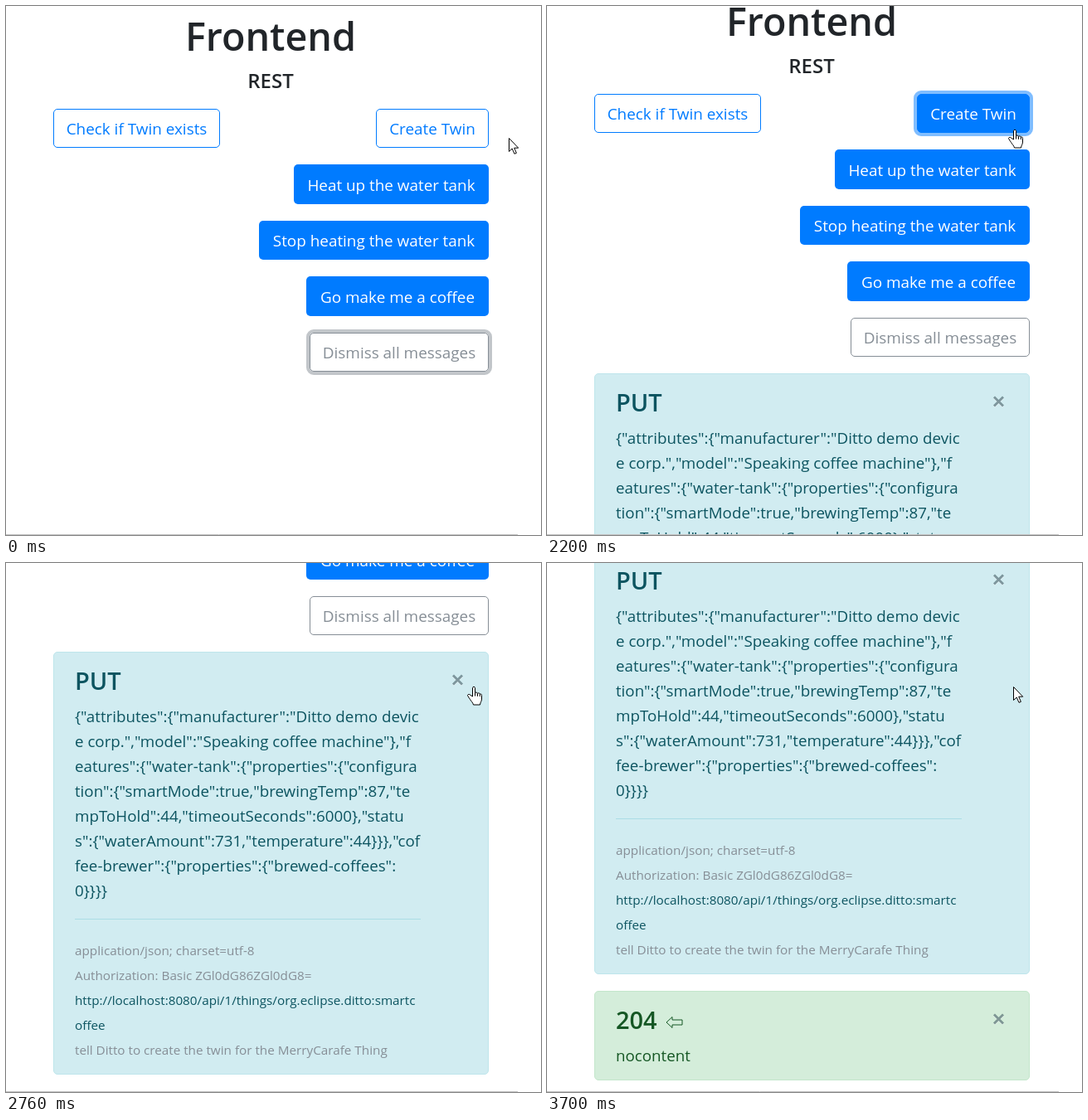
An HTML page that plays this animation: 645 px wide and 638 px high, repeating every 3.93 s.

```html
<!DOCTYPE html>
<html lang="en">
<head>
<meta charset="utf-8">
<title>Frontend</title>
<style>
  html, body { margin: 0; width: 100%; height: 100%; overflow: hidden; background: #fff; }
  svg { display: block; width: 645px; height: 638px; }
  text { font: 18.75px "Open Sans", "Noto Sans", sans-serif; }
  .mid text, .head { text-anchor: middle; }
  .head, .title { font-weight: 600; fill: #212529; }
  .h1 { font-size: 46.7px; }
  .h2 { font-size: 24px; }
  .title { font-size: 29px; }
  .btn rect { fill: #007bff; }
  .btn text { fill: #fff; font-size: 18.9px; }
  .line rect { fill: #fff; stroke: #007bff; }
  .line text { fill: #007bff; }
  .grey rect { stroke: #868e96; }
  .grey text { fill: #868e96; }
  .ring { fill: none; stroke-width: 4; opacity: .5; }
  .info text { fill: #0c5460; }
  .info .box { fill: #d1ecf1; stroke: #bee5eb; }
  .ok text { fill: #155724; }
  .ok .box { fill: #d4edda; stroke: #c3e6cb; }
  .small text { font-size: 15.25px; }
  .small .muted { fill: #868e96; }
  .x { fill: none; stroke-width: 2.8; }
  .cur { fill: #fff; stroke: #000; stroke-linejoin: round; }

  .page, .alerts, .pointer, .arrow, .hand, .oldring, .newring, .create rect, .create text {
    animation: 3930ms step-end infinite;
  }
  .page { animation-name: scroll; }
  .alerts { animation-name: show; }
  .pointer { animation-name: move; }
  .arrow { animation-name: arrow; }
  .hand { animation-name: hand; }
  .oldring { animation-name: blur; }
  .newring { animation-name: focus; }
  .create rect { animation-name: fill; }
  .create text { animation-name: ink; }

  @keyframes move {
    0% { transform: translate(606px, 159px); }
    12.46% { transform: translate(602px, 158px); }
    14.5% { transform: translate(595px, 156px); }
    16.53% { transform: translate(584px, 154px); }
    18.57% { transform: translate(574px, 152px); }
    20.61% { transform: translate(567px, 150px); }
    22.64% { transform: translate(563px, 149px); }
    24.68%, 100% { transform: translate(562px, 149px); }
  }
  @keyframes arrow {
    0% { visibility: visible; }
    18.57% { visibility: hidden; }
    94.14%, 100% { visibility: visible; }
  }
  @keyframes hand {
    0% { visibility: hidden; }
    18.57% { visibility: visible; }
    83.96%, 100% { visibility: hidden; }
  }
  @keyframes fill {
    0% { fill: #fff; }
    18.57% { fill: #99caff; }
    20.61% { fill: #1a88ff; }
    22.64%, 100% { fill: #007bff; }
  }
  @keyframes ink {
    0% { fill: #007bff; }
    18.57% { fill: #66b0ff; }
    20.61% { fill: #e5f2ff; }
    22.64%, 100% { fill: #fff; }
  }
  @keyframes blur {
    0% { opacity: .5; }
    34.6% { opacity: .33; }
    36.51% { opacity: .12; }
    38.42%, 100% { opacity: 0; }
  }
  @keyframes focus {
    0% { opacity: 0; }
    34.6% { opacity: .17; }
    36.51% { opacity: .38; }
    38.42%, 100% { opacity: .5; }
  }
  @keyframes show {
    0% { visibility: hidden; }
    40.45%, 100% { visibility: visible; }
  }
  @keyframes scroll {
    0% { transform: translateY(0); }
    55.97% { transform: translateY(-18px); }
    58.26% { transform: translateY(-61px); }
    60.43% { transform: translateY(-112px); }
    62.59% { transform: translateY(-165px); }
    64.12% { transform: translateY(-205px); }
    66.28% { transform: translateY(-262px); }
    68.44% { transform: translateY(-315px); }
    70.22% { transform: translateY(-354px); }
    72.26% { transform: translateY(-392px); }
    74.17% { transform: translateY(-424px); }
    76.08% { transform: translateY(-449px); }
    78.11% { transform: translateY(-463px); }
    80.02% { transform: translateY(-471px); }
    81.93%, 100% { transform: translateY(-475px); }
  }
</style>
</head>
<body>
<svg viewBox="0 0 645 638">
  <defs>
    <g id="close" class="x">
      <path d="M-5.5-4.5l11 11m0-11l-11 11" stroke="#fff" opacity=".4"/>
      <path d="M-5.5-5.5l11 11m0-11l-11 11" stroke="#1c3a44" opacity=".5"/>
    </g>
  </defs>

  <g class="page">
    <text class="head h1" x="319" y="54">Frontend</text>
    <text class="head h2" x="319" y="99">REST</text>

    <g class="mid">
      <g class="btn line">
        <rect x="57.5" y="124.5" width="200" height="46" rx="4.5"/>
        <text x="157.5" y="155">Check if Twin exists</text>
      </g>
      <rect class="ring newring" x="444" y="122" width="140" height="51" rx="7" stroke="#007bff"/>
      <g class="btn line create">
        <rect x="446.5" y="124.5" width="135" height="46" rx="4.5"/>
        <text x="514" y="155">Create Twin</text>
      </g>
      <g class="btn">
        <rect x="347" y="191" width="235" height="48" rx="5"/>
        <text x="464.5" y="223">Heat up the water tank</text>
        <rect x="305" y="259" width="277" height="47" rx="5"/>
        <text x="443.5" y="290">Stop heating the water tank</text>
        <rect x="362" y="326" width="220" height="48" rx="5"/>
        <text x="472" y="358">Go make me a coffee</text>
      </g>
      <rect class="ring oldring" x="364" y="392" width="220" height="51" rx="7" stroke="#868e96"/>
      <g class="btn line grey">
        <rect x="366.5" y="394.5" width="215" height="46" rx="4.5"/>
        <text x="474" y="425">Dismiss all messages</text>
      </g>
    </g>

    <g class="alerts">
      <g class="info">
        <rect class="box" x="57.5" y="461.5" width="524" height="509" rx="4.5"/>
        <text class="title" x="83" y="507">PUT</text>
        <use href="#close" x="544.5" y="495"/>
        <text x="83" y="546">{"attributes":{"manufacturer":"Ditto demo devic</text>
        <text x="83" y="576">e corp.","model":"Speaking coffee machine"},"f</text>
        <text x="83" y="606">eatures":{"water-tank":{"properties":{"configura</text>
        <text x="83" y="636">tion":{"smartMode":true,"brewingTemp":87,"te</text>
        <text x="83" y="666">mpToHold":44,"timeoutSeconds":6000},"statu</text>
        <text x="83" y="696">s":{"waterAmount":731,"temperature":44}}},"cof</text>
        <text x="83" y="726">fee-brewer":{"properties":{"brewed-coffees":</text>
        <text x="83" y="756">0}}}}</text>
        <path d="M83 783.5H500" stroke="#abdde5"/>
        <g class="small">
          <text class="muted" x="83" y="827">application/json; charset=utf-8</text>
          <text class="muted" x="83" y="857">Authorization: Basic ZGl0dG86ZGl0dG8=</text>
          <text x="83" y="887">http://localhost:8080/api/1/things/org.eclipse.ditto:smartc</text>
          <text x="83" y="917">offee</text>
          <text class="muted" x="83" y="947">tell Ditto to create the twin for the MerryCarafe Thing</text>
        </g>
      </g>
      <g class="ok">
        <rect class="box" x="57.5" y="991.5" width="524" height="107" rx="4.5"/>
        <text class="title" x="83" y="1037">204</text>
        <path d="M144 1029l7-6.5v3.5h12v6h-12v3.5z" fill="none" stroke="#155724"/>
        <use href="#close" x="544.5" y="1025"/>
        <text x="83" y="1076">nocontent</text>
      </g>
    </g>
  </g>

  <path d="M0 637.5H617" stroke="#c4c4c4"/>

  <g class="pointer">
    <path class="cur arrow" d="M.5.5v16l3.7-3.5 2.8 6.3 2.4-1-2.7-6.1h5z"/>
    <g class="cur hand">
      <path d="M.5 1.5c0-1.6 3-1.6 3 0v6.2c.6-1 2.8-.8 3 .6c.8-.9 2.6-.5 2.8.8c.9-.6 2.2 0 2.2 1.4v4.5c0 3-1.8 4-2 7h-8c-.5-2.5-2.5-4-4-6.5c-.8-1.4-2.2-3.2-2.8-4.2c-.8-1.6 1.2-2.6 2.6-1.4L.5 12z"/>
      <path d="M3.5 7.5v4M6.5 8.3v3.5M9.3 9v3" fill="none"/>
    </g>
  </g>
</svg>
</body>
</html>
```
